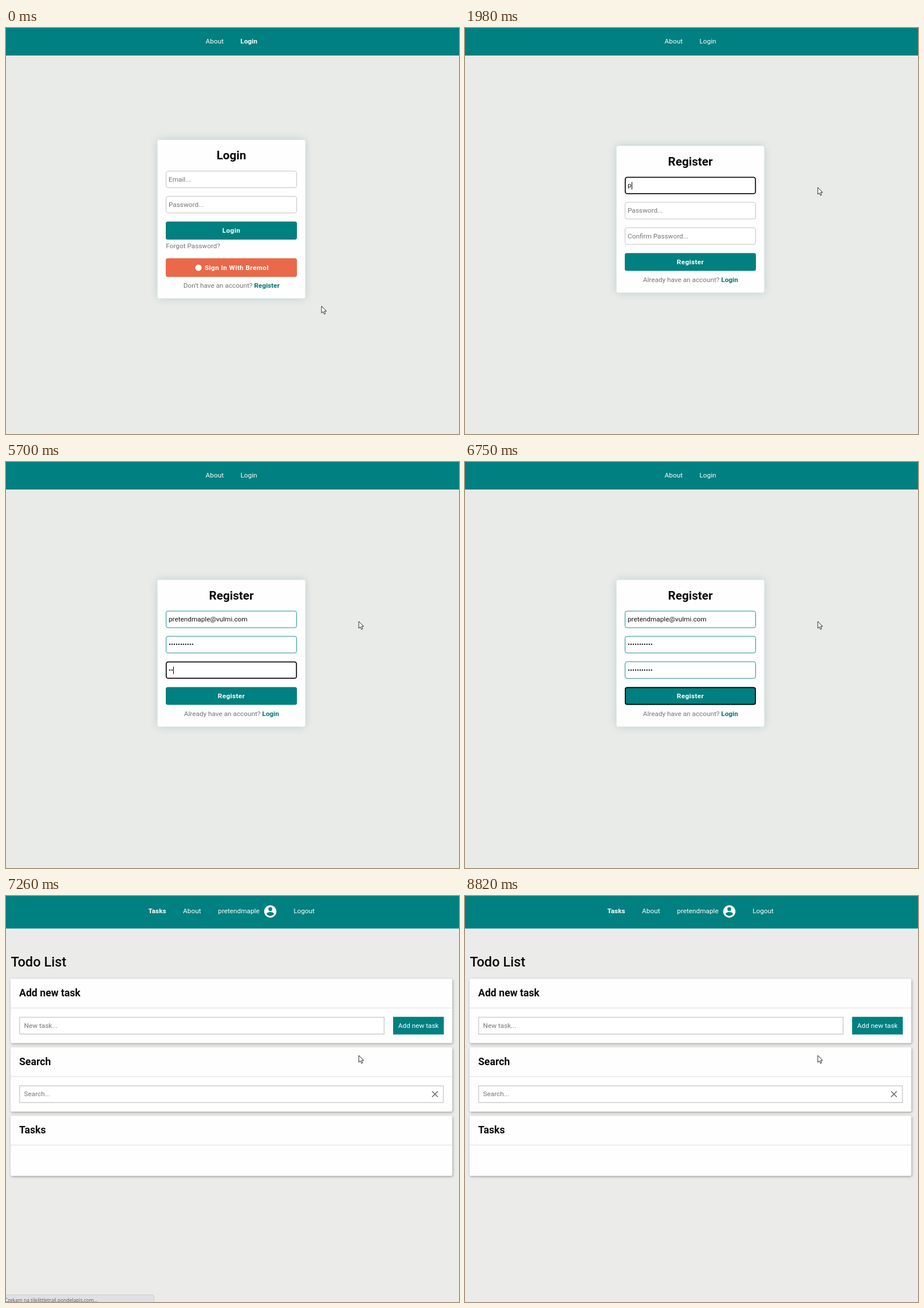
These frames come from a looping animation (791x708 px, 9030 ms). An HTML page with a canvas:

```html
<!DOCTYPE html>
<html lang="en">
<head>
<meta charset="utf-8">
<title>Register and log in</title>
<style>
  html, body { margin: 0; width: 100%; height: 100%; overflow: hidden; background: #e9ebe9; }
  canvas { display: block; }
</style>
</head>
<body>
<canvas id="stage" width="791" height="708"></canvas>
<script>
const ctx = document.getElementById('stage').getContext('2d');
const W = 791, H = 708, LOOP = 9030;
const SCALE = 0.737;              // page zoom of the recorded browser
const BODY = 16 * SCALE;
const TEAL = '#008080', GRAY = '#757575', INK = '#0a0a0a';
const CENTER = 393.5, LEFT = 279.5, FIELD_W = 228;
const USER = 'pretendmaple', EMAIL = USER + '@vulmi.com';

// Each burst: first key, last key, number of keys
const EMAIL_KEYS = [[1980, 1980, 1], [2130, 2490, 6], [2670, 3060, 6], [3240, 3480, 5], [3660, 3885, 4]];
const PASS_KEYS = [[4440, 4440, 1], [4590, 5010, 9], [5160, 5160, 1]];
const CONFIRM_KEYS = [[5460, 5460, 1], [5700, 6060, 7], [6210, 6390, 3]];

// Pointer stops: time, x, y
const PATH = [[60, 551, 485], [450, 452, 449], [930, 452, 449], [1380, 474, 275], [1440, 474, 275], [1800, 616, 278]];

const T = {
  hover: 330, register: 480, linkGone: 660, focusEmail: 1410, focusPass: 3960, focusConfirm: 5280,
  focusButton: 6630, loading: 6840, tasks: 7200, waitGone: 7380, toast: 6970, toastSeen: 7380, toastOut: 8500
};

const clamp = (v, a = 0, b = 1) => Math.min(b, Math.max(a, v));
const mix = (a, b, p) => a + (b - a) * p;
const smooth = p => p * p * (3 - 2 * p);
const easeOut = p => 1 - (1 - p) ** 3;
const within = (t, a, b) => t >= a && t < b;

function keyframes(stops, t, ease) {
  if (t <= stops[0][0]) return stops[0].slice(1);
  for (let i = 1; i < stops.length; i++) {
    const [a, b] = [stops[i - 1], stops[i]];
    if (t < b[0]) {
      const p = ease((t - a[0]) / (b[0] - a[0]));
      return a.slice(1).map((v, k) => mix(v, b[k + 1], p));
    }
  }
  return stops[stops.length - 1].slice(1);
}

function typed(bursts, t) {
  return bursts.reduce((sum, [a, b, n]) => {
    if (t < a) return sum;
    return sum + (n === 1 ? 1 : clamp(Math.floor((t - a) * (n - 1) / (b - a) + 1e-6) + 1, 0, n));
  }, 0);
}

function text(str, x, y, { size = BODY, weight = 400, color = INK, align = 'left', spacing = 0, family = 'Roboto' } = {}) {
  ctx.font = `${weight} ${size}px ${family}, sans-serif`;
  ctx.letterSpacing = spacing + 'px';
  ctx.textAlign = align;
  ctx.fillStyle = color;
  ctx.fillText(str, x, y);
  const width = ctx.measureText(str).width;
  ctx.letterSpacing = '0px';
  return width;
}

function box(x, y, w, h, r, fill, stroke, line = 1) {
  ctx.beginPath();
  ctx.roundRect(x, y, w, h, r);
  if (fill) { ctx.fillStyle = fill; ctx.fill(); }
  if (stroke) { ctx.strokeStyle = stroke; ctx.lineWidth = line; ctx.stroke(); }
}

function shadowBox(x, y, w, h, r, color, blur, dx, dy) {
  ctx.save();
  Object.assign(ctx, { shadowColor: color, shadowBlur: blur, shadowOffsetX: dx, shadowOffsetY: dy });
  box(x, y, w, h, r, '#fefefe');
  ctx.restore();
}

function disc(x, y, r, fill) {
  ctx.beginPath();
  ctx.arc(x, y, r, 0, Math.PI * 2);
  ctx.fillStyle = fill;
  ctx.fill();
}

function backdrop(color, barHeight) {
  ctx.fillStyle = color;
  ctx.fillRect(0, 0, W, H);
  ctx.fillStyle = TEAL;
  ctx.fillRect(0, 0, W, barHeight);
}

function navItem(label, x, y, bold) {
  text(label, x, y, { weight: bold ? 700 : 400, color: '#fff', align: 'center' });
}

function field(y, placeholder, value = '', focused = false, caret = true) {
  if (focused) box(LEFT + .3, y + .3, FIELD_W - .6, 28.6, 3.5, '#fff', '#101010', 1.8);
  else box(LEFT, y, FIELD_W, 29, 3.5, '#fff', value ? '#208f8f' : '#c2c2c2');
  const base = y + 18.3;
  const width = text(value || placeholder, 284, base, { color: value ? '#151515' : GRAY });
  if (focused && caret) {
    ctx.fillStyle = '#000';
    ctx.fillRect(Math.round(284 + (value ? width : 0)), y + 8.5, 1, 13);
  }
}

function button(label, y, h, color, textX = CENTER, focused = false) {
  box(279, y, 229, h, 3.5, color);
  if (focused) box(LEFT + .4, y + .9, FIELD_W - .8, h - 1.8, 3.5, null, '#0a0a0a', 1.7);
  text(label, textX, y + h / 2 + 4.2, { weight: 700, color: '#fff', align: 'center', spacing: .37 });
}

function linkLine(lead, link, y) {
  ctx.font = `700 ${BODY}px Roboto, sans-serif`;
  const linkWidth = ctx.measureText(link).width;
  ctx.font = `400 ${BODY}px Roboto, sans-serif`;
  const leadWidth = ctx.measureText(lead).width;
  const x = CENTER + .3 - (leadWidth + linkWidth) / 2;
  text(lead, x, y, { color: GRAY });
  text(link, x + leadWidth, y, { weight: 700, color: '#007474' });
}

function formPage(title, top, height, loginBold) {
  backdrop('#e9ebe9', 48);
  navItem('About', 364.3, 26.5, false);
  navItem('Login', 424, 26.5, loginBold);
  shadowBox(264.5, top, 258, height, 3.5, 'rgba(0,100,90,.2)', 15, 0, 0);
  text(title, CENTER, top + 34, { size: 28 * SCALE, weight: 700, align: 'center' });
}

function loginPage() {
  formPage('Login', 195, 276.5, true);
  field(249.5, 'Email...');
  field(293.5, 'Password...');
  button('Login', 337.5, 31.5, TEAL);
  text('Forgot Password?', 279.3, 384, { color: GRAY });
  button('Sign In With Bremol', 401.5, 32.5, '#e9694a', 402.8);
  disc(336, 418, 5.5, '#fff');
  linkLine("Don't have an account? ", 'Register', 453.2);
}

function registerPage(t) {
  formPage('Register', 205.5, 256, false);
  const dots = keys => '•'.repeat(typed(keys, t));
  field(260, 'Email...', EMAIL.slice(0, typed(EMAIL_KEYS, t)), within(t, T.focusEmail, T.focusPass));
  field(304, 'Password...', dots(PASS_KEYS), within(t, T.focusPass, T.focusConfirm), !within(t, 4200, 4440));
  field(348.3, 'Confirm Password...', dots(CONFIRM_KEYS), within(t, T.focusConfirm, T.focusButton));
  button('Register', 392.5, 31, TEAL, CENTER, within(t, T.focusButton, T.loading));
  linkLine('Already have an account? ', 'Login', 443);
  if (t >= T.loading) loader(t - T.loading);
}

function loader(age) {
  ctx.fillStyle = 'rgba(0,0,0,.2)';
  ctx.fillRect(0, 0, W, H);
  const angle = .15 + age / 1000 * Math.PI * 2;
  disc(CENTER + 33.5 * Math.sin(angle), 333.3 - 33.5 * Math.cos(angle), 6.9, '#fff');
}

function avatar(x, y) {
  disc(x, y, 10.7, '#fff');
  disc(x, y - 4.1, 3.3, TEAL);
  ctx.beginPath();
  ctx.moveTo(x - 6.4, y + 4.2);
  ctx.bezierCurveTo(x - 6, y, x + 6, y, x + 6.4, y + 4.2);
  ctx.bezierCurveTo(x + 3.2, y + 8.8, x - 3.2, y + 8.8, x - 6.4, y + 4.2);
  ctx.fill();
}

function panel(title, y, h) {
  shadowBox(8, y, 771.3, h, 2.5, 'rgba(0,0,0,.32)', 4.5, 1, 1.5);
  text(title, 23, y + 31.2, { size: 24 * SCALE, weight: 700 });
  ctx.fillStyle = '#e2e2e2';
  ctx.fillRect(8, y + 50.5, 771.3, 1.2);
}

function input(placeholder, y, w) {
  box(23.7, y, w, 29.2, 0, '#fff', '#cdcdcd', 1.5);
  text(placeholder, 31.5, y + 18.4, { color: GRAY });
}

function tasksPage() {
  backdrop('#ebebe9', 56.7);
  navItem('Tasks', 264, 30.3, true);
  navItem('About', 324.8, 30.3);
  navItem(USER, 406.5, 30.3);
  navItem('Logout', 520.5, 30.3);
  avatar(461.5, 27);
  text('Todo List', 8.5, 123, { size: 32 * SCALE, weight: 500 });

  panel('Add new task', 144.2, 112.3);
  input('New task...', 211.5, 636.6);
  ctx.fillStyle = TEAL;
  ctx.fillRect(676, 210.7, 88.5, 30.8);
  text('Add new task', 720.2, 230, { color: '#fff', align: 'center' });

  panel('Search', 263.7, 112.3);
  input('Search...', 331, 740);
  ctx.beginPath();
  for (const s of [-5, 5]) {
    ctx.moveTo(749 - s, 340.5);
    ctx.lineTo(749 + s, 350.5);
  }
  ctx.strokeStyle = '#666';
  ctx.lineWidth = 1.6;
  ctx.stroke();

  panel('Tasks', 383.2, 104.8);
}

function statusBar(label, width, top, alpha) {
  ctx.save();
  ctx.globalAlpha = alpha;
  box(-4, top + .5, width + 3.5, 30, 3, '#dee1e6', '#c9ccd1');
  text(label, -2.5, top + 13, { size: 8.5, color: '#55595e', family: '"Open Sans"' });
  ctx.restore();
}

function toastShift(t) {
  const age = t - T.toast;
  if (t < T.toastOut) {
    return keyframes([[0, 3000], [420, -25], [525, 10], [630, -5], [700, 0]], age, easeOut)[0];
  }
  return keyframes([[0, 0], [140, -20], [700, 2000]], t - T.toastOut, smooth)[0];
}

function toast(t) {
  const w = 236, h = 47.2, y = 11.8;
  const x = W - 11.8 - w + toastShift(t) * SCALE;
  if (x > W + 10) return;
  shadowBox(x, y, w, h, 3, 'rgba(0,0,0,.1)', 7, 0, 1);
  disc(x + 18, y + 23, 7, '#07bc0c');
  ctx.beginPath();
  ctx.moveTo(x + 14.5, y + 23);
  ctx.lineTo(x + 17.2, y + 25.6);
  ctx.lineTo(x + 21.6, y + 20.4);
  ctx.strokeStyle = '#fff';
  ctx.lineWidth = 1.5;
  ctx.stroke();
  text('Account created!', x + 32, y + 27, { color: GRAY });
  const left = 1 - clamp((t - T.toast) / (T.toastOut - T.toast));
  ctx.fillStyle = '#07bc0c';
  ctx.fillRect(x, y + h - 3.7, w * left, 3.7);
}

function polygon(points, x, y) {
  ctx.beginPath();
  points.forEach(([px, py]) => ctx.lineTo(x + px, y + py));
  ctx.closePath();
  ctx.fillStyle = '#fff';
  ctx.strokeStyle = '#111';
  ctx.lineWidth = .9;
  ctx.lineJoin = 'round';
  ctx.fill();
  ctx.stroke();
}

const ARROW = [[0, 0], [0, 12], [2.8, 9.6], [4.7, 13.9], [6.7, 13], [4.9, 8.9], [8.5, 8.7]];
const HAND = [[-1, 0], [.8, 0], [1, 5], [7, 6.5], [7.5, 10], [6, 15], [-1, 15], [-5, 9], [-4, 8], [-1.2, 10]];

function pointer(t) {
  const [x, y] = keyframes(PATH, t, smooth);
  const overX = within(x, 279, 508);
  const onLink = within(t, T.hover, T.register) && within(x, 433, 478);
  const onButton = t > T.register && overX && within(y, 393, 423);
  const onField = t > T.register && overX && [260, 304, 348].some(top => within(y, top, top + 29));
  if (onLink || onButton) polygon(HAND, x, y);
  else if (onField) {
    ctx.fillStyle = '#222';
    ctx.fillRect(x - .5, y - 6, 1, 12);
    ctx.fillRect(x - 2.5, y - 6.5, 5, 1);
    ctx.fillRect(x - 2.5, y + 5.5, 5, 1);
  } else polygon(ARROW, x, y);
}

function draw(t) {
  if (t < T.register) loginPage();
  else if (t < T.tasks) registerPage(t);
  else tasksPage();

  if (within(t, T.hover, 720)) {
    statusBar('localhost:3000/register', 189, 701, 1 - clamp((t - T.linkGone + 30) / 90));
  }
  if (within(t, T.tasks, 7470)) {
    statusBar('Czekam na tilelittletrail.pondelapis.com...', 259, 695, 1 - clamp((t - T.waitGone) / 90));
  }
  if (t >= T.toastSeen) toast(t);
  pointer(t);
}

function frame() {
  draw(performance.now() % LOOP);
  requestAnimationFrame(frame);
}
frame();
</script>
</body>
</html>
```
